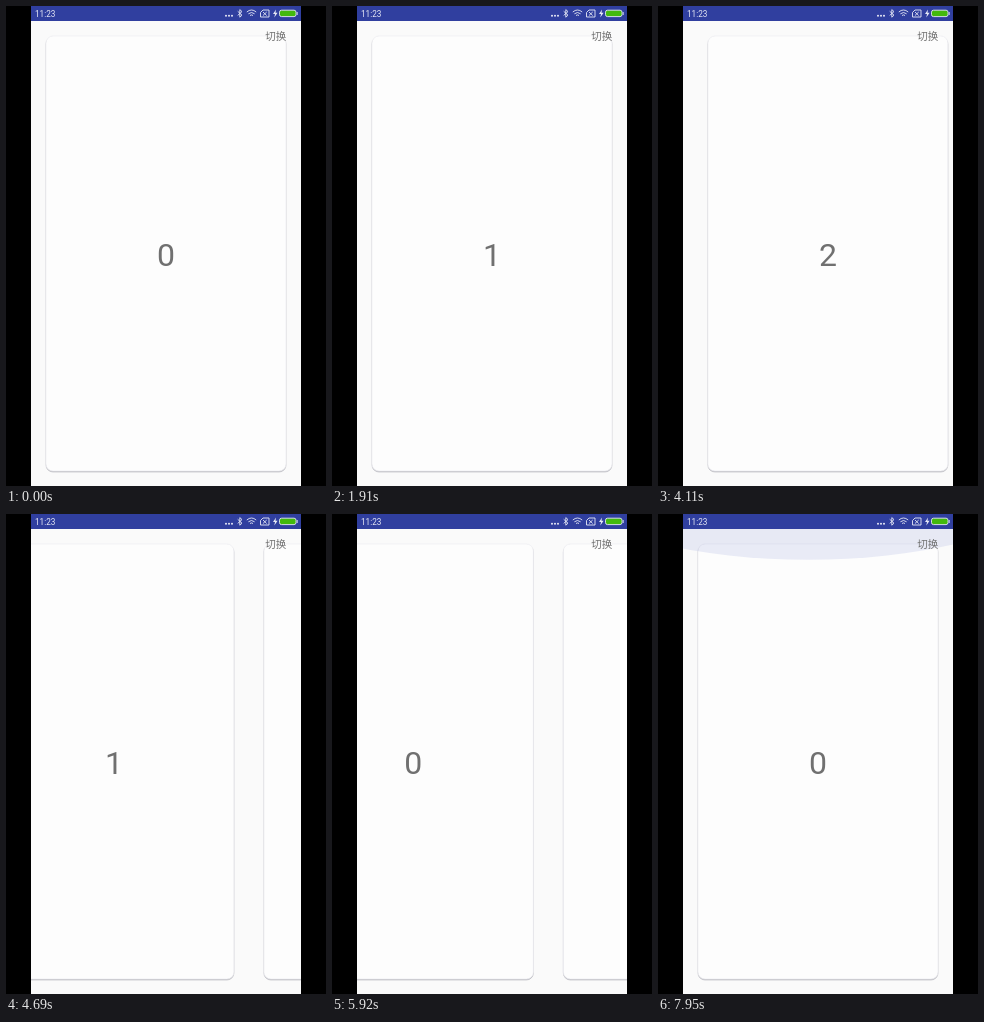
Write an HTML page that moves like this. It is 320x480 px and loops after 8 s.

```html
<!DOCTYPE html>
<html lang="zh">
<head>
<meta charset="utf-8">
<title>Card pager</title>
<style>
  html, body { margin: 0; width: 100%; height: 100%; overflow: hidden; background: #000; }
  svg { display: block; width: 100%; height: 100%; }
  text { font-family: Roboto, "Noto Sans CJK SC", "Noto Sans CJK", sans-serif; }
  .card { fill: #fdfdfd; stroke: #ececf1; stroke-width: .7; filter: drop-shadow(0 1px .7px #bcbcc2); }
  .digit { font-size: 32px; fill: #707070; text-anchor: middle; }
  .line { fill: none; stroke: #e6e8f5; stroke-width: .9; }
  .solid { fill: #e6e8f5; }
</style>
</head>
<body>
<svg viewBox="0 0 320 480">
  <clipPath id="screen"><rect x="25" y="15" width="270" height="465"/></clipPath>
  <g clip-path="url(#screen)">
    <rect x="25" y="15" width="270" height="465" fill="#fafafa"/>
    <g id="pages"></g>
    <ellipse id="glow" cx="150" rx="405" fill="#3f51b5"/>
  </g>
  <text x="259.3" y="33.7" font-size="10.5" fill="#707070">切换</text>

  <rect x="25" width="270" height="15" fill="#303f9f"/>
  <text class="solid" x="29" y="11" font-size="8.2">11:23</text>
  <g class="solid">
    <circle cx="220" cy="9.7" r="1"/><circle cx="223" cy="9.7" r="1"/><circle cx="226" cy="9.7" r="1"/>
    <path d="M270 3.5 L267 8 H269 L268.3 11.5 L271.6 6.8 H269.5Z"/>
  </g>
  <g class="line">
    <path d="M231.7 5.3 L236 9.2 L233.8 11.2 V3.6 L236 5.6 L231.7 9.4"/>
    <path d="M240.8 6 Q245.5 2 250.2 6 M242.4 7.8 Q245.5 5.2 248.6 7.8 M244 9.5 Q245.5 8.3 247 9.5"/>
    <path d="M257 4 H263 V11 H254.5 V6.5Z M257 6 L260.7 9.5 M260.7 6 L257 9.5"/>
    <rect x="273.5" y="4.2" width="16.5" height="6.4" rx="2" fill="#43b90d"/>
    <path d="M291.2 6 V9"/>
  </g>
</svg>
<script>
const LOOP = 8000, PAGE = 270;
const pages = document.getElementById('pages');
const glow = document.getElementById('glow');

pages.innerHTML = [0, 1, 2].map(n => `<g transform="translate(${n * PAGE})">
  <rect class="card" x="40" y="30" width="240" height="435" rx="7"/>
  <text class="digit" x="160" y="259.7">${n}</text></g>`).join('');

// "left" is the distance still to travel when the finger lets go.
const swipes = [
  { start: 640, release: 1090, end: 1910, from: 0, to: 1, left: 189 },
  { start: 2360, release: 2630, end: 3430, from: 1, to: 2, left: 180 },
  { start: 4040, release: 4310, end: 5110, from: 2, to: 1, left: 189 },
  { start: 5240, release: 5660, end: 6410, from: 1, to: 0, left: 185 },
];
// Moments at which the screen stalls for 100 ms.
const stalls = [1090, 1370, 3150, 4690, 4830];

// Power-curve drag joined at equal speed to a quadratic settle.
function travelled(s, t) {
  if (t >= s.end) return PAGE;
  const settle = s.end - s.release, drag = s.release - s.start;
  if (t >= s.release) return PAGE - s.left * ((s.end - t) / settle) ** 2;
  const dragged = PAGE - s.left;
  const power = 2 * s.left / settle * drag / dragged;
  return dragged * ((t - s.start) / drag) ** power;
}

function scrollAt(t) {
  const s = swipes.filter(swipe => t >= swipe.start).pop();
  return s ? s.from * PAGE + (s.to - s.from) * travelled(s, t) : 0;
}

// Overscroll glow: flattened circle that stretches ever slower as the pull grows.
function drawGlow(t) {
  const pull = Math.min(1, Math.max(0, (t - 7390) / 560));
  const stretch = 1 / .7 * (.7 - 1 / Math.sqrt(2.04 + 9.06 * pull));
  glow.setAttribute('ry', 405 * Math.max(0, stretch));
  glow.setAttribute('cy', 15 - 351 * stretch);
  glow.setAttribute('opacity', .1 * pull);
}

function draw(now) {
  let t = now % LOOP;
  const stall = stalls.find(at => t >= at && t < at + 100);
  if (stall) t = stall;
  pages.setAttribute('transform', `translate(${-scrollAt(t)})`);
  drawGlow(t);
}

const began = performance.now();
function tick() {
  draw(performance.now() - began);
  requestAnimationFrame(tick);
}
tick();
</script>
</body>
</html>
```
